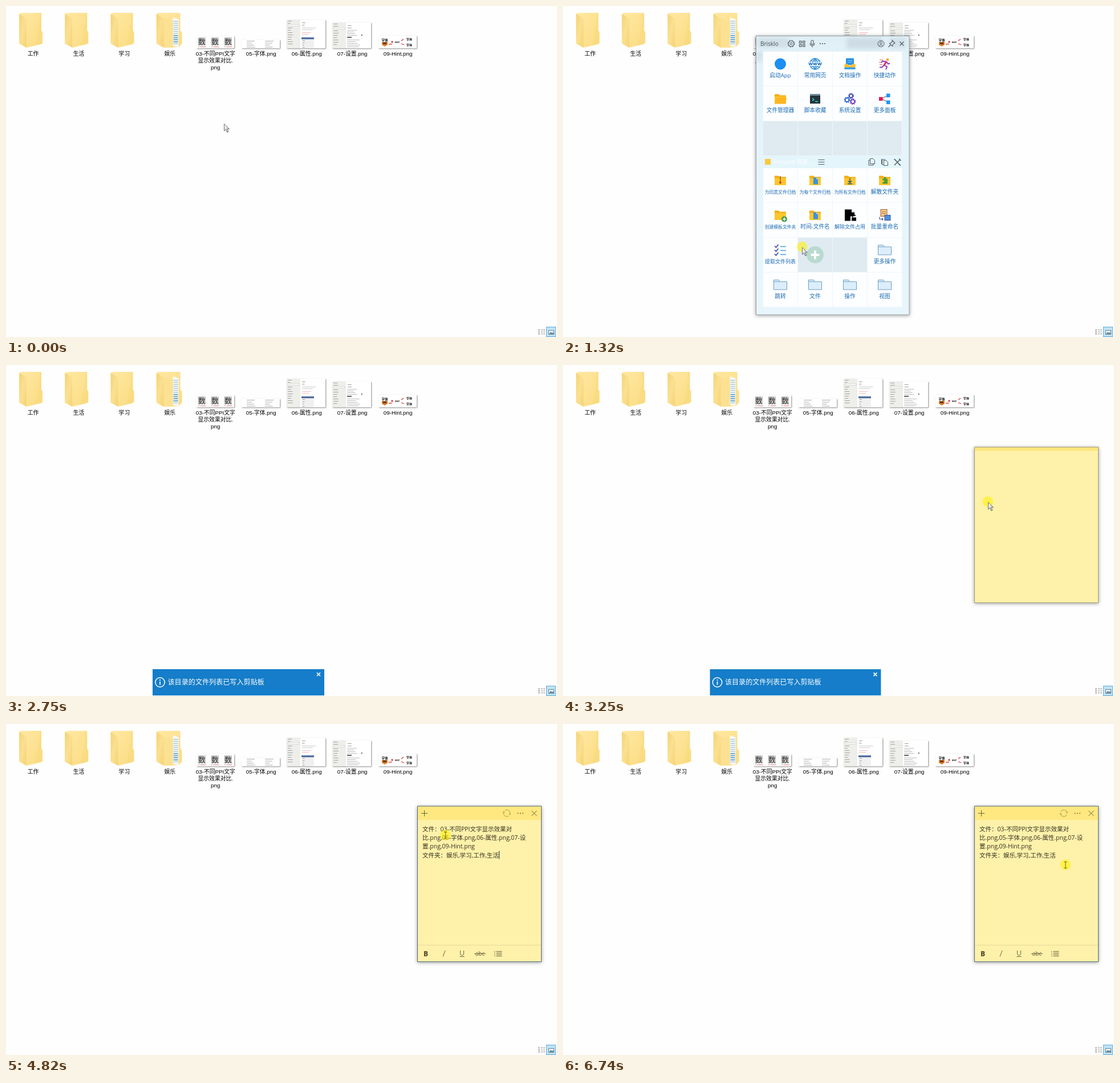
An HTML page that plays this animation: 966 by 580 pixels, repeating every 6790 ms.

```html
<!DOCTYPE html>
<html lang="zh-CN">
<head>
<meta charset="utf-8">
<title>文件列表</title>
<style>
html, body { margin: 0; width: 100%; height: 100%; overflow: hidden; background: #fefefe; }
svg { display: block; width: 966px; height: 580px; }
text { font-family: "Liberation Sans", "Noto Sans CJK SC", "Noto Sans CJK", sans-serif; white-space: pre; }
.ui text { font-family: "Open Sans", "Noto Sans CJK SC", "Noto Sans CJK", sans-serif; }
</style>
</head>
<body>
<svg id="stage" viewBox="0 0 966 580" xmlns="http://www.w3.org/2000/svg"></svg>
<script>
const LOOP = 6790;
const stage = document.getElementById('stage');

const rect = (x, y, w, h, fill, more = '') =>
  `<rect x="${x}" y="${y}" width="${w}" height="${h}" fill="${fill}" ${more}/>`;
const path = (d, fill, more = '') => `<path d="${d}" fill="${fill}" ${more}/>`;
const line = (d, stroke, width = 1, more = '') =>
  `<path d="${d}" fill="none" stroke="${stroke}" stroke-width="${width}" ${more}/>`;
const circle = (x, y, r, fill, more = '') => `<circle cx="${x}" cy="${y}" r="${r}" fill="${fill}" ${more}/>`;
const text = (x, y, s, size, fill = '#000', more = '') =>
  `<text x="${x}" y="${y}" font-size="${size}" fill="${fill}" ${more}>${s}</text>`;
const mid = 'text-anchor="middle"';
const at = (x, y, body) => `<g transform="translate(${x} ${y})">${body}</g>`;
const repeat = (n, make) => Array.from({ length: n }, (_, i) => make(i)).join('');

// Rows of tiny unreadable writing, with varied lengths
const scribble = (x, y, n, gap, width, color) => repeat(n, i =>
  rect(x, y + i * gap, width * (0.55 + 0.45 * Math.abs(Math.sin(i * 2.3 + x))), 1, color, 'opacity=".45"'));

const defs = `<defs>
  <linearGradient id="body" x2="1" y2="1"><stop stop-color="#ffe8a2"/><stop offset="1" stop-color="#fbdc83"/></linearGradient>
  <linearGradient id="flap" x2="1" y2="1"><stop stop-color="#f5d373"/><stop offset=".5" stop-color="#fbe092"/><stop offset="1" stop-color="#f5d373"/></linearGradient>
  <linearGradient id="arrow" x2="1" y2="1"><stop stop-color="#fff"/><stop offset="1" stop-color="#b4b8bc"/></linearGradient>
  <linearGradient id="glass" x2="0" y2="1"><stop stop-color="#dfedf4"/><stop offset=".08" stop-color="#e4f3fa"/><stop offset="1" stop-color="#e8f6fc"/></linearGradient>
  <filter id="blur"><feGaussianBlur stdDeviation="3"/></filter>
  <filter id="shade" x="-10%" y="-10%" width="120%" height="120%"><feDropShadow dx="0" dy="1" stdDeviation="3" flood-opacity=".4"/></filter>
  <filter id="small" x="-10%" y="-10%" width="120%" height="130%"><feDropShadow dx="1" dy="1" stdDeviation=".8" flood-opacity=".45"/></filter>
</defs>`;

function folder(x, filled) {
  if (!filled) {
    return at(x, 12, path('M2 0H39V31L41 34V53L38 55L13 61Z', 'url(#body)') +
      path('M27 57Q35 34 36 0H39V31L41 34V53L38 55Z', '#f8d877', 'opacity=".4"') +
      path('M0 1L11 9Q13 10 13 13V61L0 54Z', 'url(#flap)'));
  }
  const docs = path('M29 8L39 11V60L29 58Z', '#f8f8f5') +
    repeat(12, i => rect(30, 14 + i * 3.6, 8, 1.5, i > 6 && i < 11 ? '#3d8fc8' : '#a5cbe4'));
  return at(x, 12, path('M2 0H42V31L45 34V54L39 60L13 61Z', 'url(#body)') + docs +
    path('M12 9L29 14V61H13Z', '#fce193') + path('M0 1L11 9Q13 10 13 13V61L0 54Z', 'url(#flap)'));
}

const card = (x, y, w, h) => rect(x, y, w, h, '#fff', 'filter="url(#small)"');

function thumbnails() {
  const glyphs = repeat(3, i => {
    const x = 336.5 + i * 23;
    return rect(x, 55, 13.5, 14, '#c9c9c9') + text(x + 6.8, 66.8, '数', 12.8, '#333', mid) +
      rect(x, 71, 3, 1, '#aaa') + rect(x + 4, 71, 10, 1, '#e37a7a');
  });
  const settings = (x, y, h) => card(x, y, 68, h) + rect(x, y, 24, h, '#eeeeea') +
    scribble(x + 2, y + 2, 2, 4, 8, '#444') + rect(x + 2, y + 9, 20, 2.5, '#fff', 'stroke="#bbb" stroke-width=".5"') +
    scribble(x + 2, y + 14, Math.floor((h - 15) / 4), 4, 9, '#444') +
    scribble(x + 27, y + 5, 2, 4, 7, '#222');
  const six = settings(492, 24, 50) + scribble(519, 38, 2, 3, 30, '#888') + scribble(519, 46, 2, 3, 19, '#d66') +
    rect(518, 55, 22, 3.5, '#4f6da0') + rect(518, 58.5, 22, 15, '#f0f0f0') + scribble(520, 60, 4, 4, 4, '#444');
  const seven = settings(572, 29, 45) + scribble(598, 42, 4, 3, 18, '#666') + rect(598, 54, 8, 1.5, '#333') +
    scribble(598, 59, 5, 3, 23, '#666') + rect(623, 50, 1.5, 2, '#444');
  const bold = (x, y, s, size) => text(x, y, s, size, '#111', mid + ' font-weight="900"');
  const hint = card(653, 52, 67, 22) + path('M659 63H669V68L664 71L659 68Z', '#d9822b') + rect(661, 64, 6, 3, '#6a3515') +
    line('M671 68Q674 66 677 67M693 61L697 58M693 66L698 68', '#d33', 1.2) + circle(677, 63, 1.8, '#dd4646') +
    bold(664, 62, '字体', 5.5) + bold(686, 65, 'HINT', 3.7) + bold(707, 60, '字体', 5) + bold(707, 70, '字体', 5);
  return card(334, 53, 66, 21) + glyphs + card(413, 59, 67, 15) +
    scribble(422, 61, 4, 3.5, 15, '#444') + scribble(454, 61, 4, 3.5, 15, '#444') + six + seven + hint;
}

function desktop() {
  const names = ['工作', '生活', '学习', '娱乐', '03-不同PPI文字', '05-字体.png', '06-属性.png', '07-设置.png', '09-Hint.png'];
  const label = (x, y, s) => text(x, y, s, 9.8, '#000', mid);
  const list = repeat(3, i => rect(933, 566.5 + i * 3.5, 3, 2, '#aaa') + line(`M938 ${567.5 + i * 3.5}h3m1 0h3`, '#888'));
  return repeat(4, i => folder(23 + i * 80.2, i === 3)) + thumbnails() +
    names.map((s, i) => label(47.5 + i * 79.95, 86.5, s)).join('') +
    label(367.3, 98.5, '显示效果对比.') + label(367.3, 110.5, 'png') + list +
    rect(947.5, 562.5, 16, 17, '#bfe3f5', 'stroke="#62acd8"') +
    rect(951.5, 568.5, 9, 7, '#eef7fb', 'stroke="#6d8794"') + path('M952 574.5l3-3 2 1.5 2-1 1.5 2.5z', '#3e6a86');
}

const yellowFolder = (extra = '') => path('M-10-8h7l2 2h11v14h-20z', '#f2ad16') + rect(-10, -4, 20, 12.5, '#fdc62f', 'rx="1"') + extra;
const paleFolder = path('M-11.5-8.5h9l2 3h12v14h-23z', '#dceefb', 'stroke="#6c9fc6"') + line('M-11.5-5.5h11', '#6c9fc6');
const bluePage = path('M-3-5h5l3 3v9h-8z', '#3d94d8') + path('M2-5v3h3z', '#b5dcf7');
const gear = (x, y, r, color) => circle(x, y, r, 'none', `stroke="${color}" stroke-width="1.7"`) +
  circle(x, y, r + 1.4, 'none', `stroke="${color}" stroke-width="1.6" stroke-dasharray="${(r + 1.4) * Math.PI / 8}"`);

const icons = {
  launch: circle(0, 0, 10, '#1d8ff2'),
  globe: circle(0, 0, 9.5, 'none', 'stroke="#1b82d2" stroke-width="1.3"') +
    line('M0-9V9M-8-5H8M-8 5H8M0-9C-6-4-6 4 0 9C6 4 6-4 0-9', '#1b82d2', 1.1) + rect(-11, -3.5, 22, 7, '#fff') +
    text(0, 2.7, 'WWW', 7.5, '#1670bd', mid + ' font-weight="800"'),
  tray: rect(-7, -10, 14, 12, '#2a92e6', 'rx="1"') + line('M-4-6H4M-4-3H4', '#8ccaf8') +
    path('M-9.5 0H-4L-2 3H2L4 0H9.5V9H-9.5Z', '#fdc02f') + rect(-9.5, 6, 19, 3.5, '#3aa0ee'),
  run: circle(5, -7.5, 2.3, '#f5a623') + line('M3-4L-1 2L4 5L2 10M-1 2L-5 6H-9M3-4L-4-5L-6-2M3-4L6 0L9-1', '#8b3bc4', 2) +
    line('M-9-7h6M-10-3h4M-9 1h5', '#f0653a', 1.2) + line('M3-4L-1 2', '#e8305c', 3),
  files: yellowFolder(path('M-10 9L-7-2H11L9 9Z', '#ffb520')),
  shell: rect(-9, -8.5, 18, 17, '#24343c') + rect(-9, -8.5, 18, 3, '#78909c') + line('M-5-1l3 2.5-3 2.5M0 5h5', '#39e0d0', 1.4),
  gears: gear(-5, 2, 3.3, '#2869c9') + gear(2, -5, 3, '#3446b4') + gear(5, 5, 3.3, '#6e35b9'),
  share: line('M-6 0L6-6M-6 0L6 6', '#8795a3', 1.5) + rect(-10, -3, 6.5, 6.5, '#e5174f') + rect(3, -9, 6.5, 6.5, '#2196f3') + rect(3, 3, 6.5, 6.5, '#2196f3'),
  zip: yellowFolder(line('M0-7V2', '#8b4b20', 2, 'stroke-dasharray="1.5 1"') + circle(0, 4, 2, '#d04028')),
  each: yellowFolder(bluePage),
  all: yellowFolder(line('M0-4V4M-3 1L0 4L3 1M-4 6H4', '#24526d', 1.4)),
  split: yellowFolder(path('M-4-3h3q-1-3 1.5-3t1.5 3h3v9h-9v-3q3 1 3-1.5t-3-1.5z', '#4f9d37')),
  add: yellowFolder(circle(7, 7, 5, '#3e9d3d') + line('M4 7H10M7 4V10', '#fff', 1.6)),
  unlock: path('M-9-10H3L8-5V10H-9Z', '#000') + path('M3-10V-5H8Z', '#fff') +
    rect(1, 2, 11, 9, '#fff') + rect(3, 4, 8, 6, '#000') + line('M4.5 4V2q0-2.5 2.5-2.5t2.5 2', '#000', 1.3),
  rename: rect(-7, -10, 11, 12, '#f7c889', 'stroke="#a05d32"') + line('M-5-6H2M-5-3H2', '#b5704a') + rect(0, 0, 10, 9, '#4d8fd6', 'stroke="#41589a"') +
    line('M-9 3v4h6M-5 5l2 2-2 2', '#558', 1.2),
  checks: repeat(3, i => line(`M-10 ${-7 + i * 7}l2.5 2.5l4-5`, '#3c41b5', 1.6) + line(`M0 ${-6 + i * 7}h10`, '#4aa5ee', 1.6)),
  pale: paleFolder
};

function cell(col, row, icon, label, size = 9.7) {
  const x = 351 + col * 61;
  return rect(x, row, 60, 60, '#fdfeff') + at(x + 30, row + 21.5, icons[icon]) +
    text(x + 30, row + 42 + size * 0.36, label, size, '#1b6cb5', mid);
}
const gap = (col, row) => rect(351 + col * 61, row, 60, 60, '#e0ebf1');

function panel() {
  const g = '#555d63';
  const dots = (x, y) => repeat(3, i => circle(x + i * 4, y, 1.1, g));
  const ghosts = `<g filter="url(#blur)" opacity=".35">${rect(342, 56, 54, 17, '#b4c4cc')}${rect(497, 56, 62, 19, '#a9bcc6')}${rect(574, 56, 26, 18, '#b7c8d1')}${rect(341, 80, 8, 18, '#a9bcc6')}</g>`;
  const head = text(346, 69.8, 'Brisklo', 10, '#4b5359') +
    circle(400, 66, 2, 'none', `stroke="${g}"`) + circle(400, 66, 5, 'none', `stroke="${g}" stroke-width="1.2"`) +
    circle(400, 66, 6, 'none', `stroke="${g}" stroke-dasharray="2.2 2.5"`) +
    repeat(4, i => rect(414.5 + (i % 2) * 6, 61.5 + (i >> 1) * 6, 3.5, 3.5, 'none', `stroke="${g}" stroke-width="1.2"`)) +
    rect(435, 60, 4, 7.5, 'none', `rx="2" stroke="${g}" stroke-width="1.1"`) + line('M433 65q0 4.5 4 4.5t4-4.5M437 69.5v3', g, 1.1) +
    dots(451, 66) + circle(557.5, 66, 5.5, 'none', `stroke="${g}"`) + circle(557.5, 64.5, 2, 'none', `stroke="${g}"`) + line('M554 70q3.5-4 7 0', g) +
    line('M577 60l5 5-2 .5-2 3-.5 2-5-5 2-.5 3-3zM574.5 68l-4 4', g, 1.1) + line('M590.5 62.5l7 7m0-7l-7 7', g, 1.2);
  const bar = rect(354, 268, 10, 10, '#fbc73c') + text(369, 277, 'Fenvora 资源…', 10, '#fff') +
    line('M447.5 269.5h11m-11 4h11m-11 4h11', g, 1.1) +
    line('M538.5 267.5h5l3 3v6h-8zM538 270h-2v9h8v-2', g) + line('M565 269h-5.5v9h3M562.5 270.5h4l3 3v6h-7zM558.5 268v9', g) +
    line('M582 269l9 10M591 269l-10 10M580.5 268l3 3M589 267.5l3.5 3.5M589 278l3 1', g, 1.5);
  return rect(338.5, 52.5, 268.5, 488.5, 'url(#glass)', 'stroke="#929da3" filter="url(#shade)"') + ghosts +
    rect(351, 80, 244, 448, '#edf7fb') + rect(351, 263, 244, 21, '#e4f5fc') + head + bar +
    cell(0, 80, 'launch', '启动App') + cell(1, 80, 'globe', '常用网页') + cell(2, 80, 'tray', '文档操作') + cell(3, 80, 'run', '快捷动作') +
    cell(0, 141, 'files', '文件管理器') + cell(1, 141, 'shell', '脚本收藏') + cell(2, 141, 'gears', '系统设置') + cell(3, 141, 'share', '更多面板') +
    repeat(4, i => gap(i, 202)) +
    cell(0, 284, 'zip', '为同类文件归档', 7.8) + cell(1, 284, 'each', '为每个文件归档', 7.8) + cell(2, 284, 'all', '为所有文件归档', 7.8) + cell(3, 284, 'split', '解散文件夹') +
    cell(0, 345, 'add', '创建模板文件夹', 7.8) + cell(1, 345, 'each', '时间-文件名') + cell(2, 345, 'unlock', '解除文件占用', 9) + cell(3, 345, 'rename', '批量重命名') +
    cell(0, 406, 'checks', '提取文件列表', 9) + gap(1, 406) + gap(2, 406) + cell(3, 406, 'pale', '更多操作') +
    ['跳转', '文件', '操作', '视图'].map((s, i) => cell(i, 467, 'pale', s)).join('') +
    `<g id="plus">${circle(442, 436, 15, '#b9dacf')}${line('M434.5 436h15m-7.5-7.5v15', '#fff', 4)}</g>` +
    rect(351, 406, 60, 60, '#7cc4ee', 'id="hover" opacity=".22"');
}

const toast = rect(-150.5, -23, 301, 46, '#157dc9') +
  circle(-137.5, 0, 8.2, 'none', 'stroke="#fff" stroke-width="1.5"') + line('M-137.5-1.5v6', '#fff', 1.7) + circle(-137.5, -4, 1.1, '#fff') +
  text(-124, 4.3, '该目录的文件列表已写入剪贴板', 12.1, '#fff', 'font-weight="500"') + line('M137.5-17l6 6m0-6l-6 6', '#fff', 1.7);

function note() {
  const g = '#6b6440';
  const rows = ['文件：03-不同PPI文字显示效果对', '比.png,05-字体.png,06-属性.png,07-设', '置.png,09-Hint.png', '文件夹：娱乐,学习,工作,生活'];
  const tools = rect(721, 144, 218, 24, '#ffe87f') + line('M728 156.5h11m-5.5-5.5v11M921.5 152l9 9m0-9l-9 9', g) +
    repeat(3, i => circle(897.5 + i * 4.3, 156.5, 0.9, g)) +
    `<g id="sync">${line('M-5.5 1A5.5 5.5 0 0 1 4-3.8M5.5-1A5.5 5.5 0 0 1-4 3.8M4.5-6v2.5h-2.5M-4.5 6v-2.5h2.5', '#b5a55c')}</g>` +
    line('M721 387.5h218', '#eadb98') + text(736, 406.5, 'B', 12, '#5b5434', mid + ' font-weight="800"') +
    line('M770 397l-4 10.5M796.5 397v5q0 3.5 3 3.5t3-3.5v-5M795.5 407.5h8', g) +
    text(831, 405.5, 'abc', 10, g, mid) + line('M821 402.5h20', g) +
    repeat(4, i => line(`M856 ${398.5 + i * 2.7}h1.5m2 0h10`, g));
  return rect(721, 144, 218, 273, '#fef1aa', 'filter="url(#shade)"') + rect(721, 144, 218, 6.5, '#ffe67c') +
    `<g id="tools">${tools}</g>` + rect(721.5, 144, 217, 272.5, 'none', 'id="edge"') +
    `<g id="words">${rows.map((s, i) => text(730, 188 + i * 15.2, s, 10.5, '#33301f')).join('')}</g>` +
    rect(0, 0, 1, 14, '#222', 'id="caret"');
}

stage.innerHTML = defs + desktop() + `<g class="ui"><g id="panel">${panel()}</g><g id="toast">${toast}</g><g id="note">${note()}</g></g>
  <g id="cursor">${circle(0, -0.5, 9.2, '#fff200', 'id="halo" opacity=".58"')}
  ${path('M.5.5V13l3-2.7 2.2 5 2.3-1-2.2-4.8h3.7z', 'url(#arrow)', 'id="pointer" stroke="#666" stroke-width=".9" stroke-linejoin="round"')}
  ${line('M-2.5-5.5h2l.5.5.5-.5h2M0-5V5M-2.5 5.5h2l.5-.5.5.5h2', '#8a8420', 1.3, 'id="beam"')}</g>`;

const part = {};
stage.querySelectorAll('[id]').forEach(node => part[node.id] = node);

const clamp = v => Math.max(0, Math.min(1, v));
const smooth = p => p * p * (3 - 2 * p);
const easeOut = p => 1 - (1 - p) ** 3;
const show = (node, on) => node.setAttribute('visibility', on ? 'inherit' : 'hidden');
const place = (node, x, y, more = '') => node.setAttribute('transform', `translate(${x} ${y}) ${more}`);

// time, x, y
const trail = [
  [0, 382, 206], [40, 382, 206], [320, 472, 272], [930, 472, 272], [1320, 419, 422.5], [1510, 393, 437],
  [2390, 393, 437], [2740, 637, 317], [3250, 745, 240], [3750, 761, 168], [4000, 761, 168],
  [4350, 770.5, 195], [5270, 770.5, 195], [5970, 881, 247], [LOOP, 881, 247]
];

function cursorAt(t) {
  const i = Math.max(1, trail.findIndex(stop => stop[0] > t));
  const [a, b] = [trail[i - 1], trail[i]];
  const p = smooth((t - a[0]) / (b[0] - a[0]));
  return [a[1] + (b[1] - a[1]) * p, a[2] + (b[2] - a[2]) * p];
}

function draw(t) {
  const [x, y] = cursorAt(t);
  place(part.cursor, x, y);
  show(part.cursor, t < 2750 || t >= 3250);
  show(part.halo, t >= 40);
  const typing = t >= 4150;
  show(part.pointer, !typing);
  show(part.beam, typing);

  const open = t >= 300 && t < 1710;
  show(part.panel, open);
  part.panel.setAttribute('opacity', clamp((t - 280) / 120));
  const inRow = open && y > 406 && y < 466;
  show(part.plus, inRow && x >= 412 && x < 472);
  show(part.hover, inRow && x < 412);

  const grow = easeOut(clamp((t - 1900) / 365)) * (1 - smooth(clamp((t - 3240) / 300)));
  show(part.toast, grow > 0);
  part.toast.setAttribute('opacity', grow);
  place(part.toast, 407.5, 556, `scale(${grow})`);

  const active = t >= 3960;
  show(part.note, t >= 3060);
  show(part.tools, active);
  part.tools.setAttribute('opacity', clamp((t - 3940) / 150));
  part.edge.setAttribute('stroke', active ? '#566f7d' : '#a39c79');

  const pasted = t >= 4640;
  show(part.words, pasted);
  const blink = Math.floor((t - (pasted ? 4640 : 4110)) / 530) % 2 === 0;
  show(part.caret, t >= 4110 && blink);
  place(part.caret, pasted ? 864 : 730, pasted ? 222.5 : 177);
  place(part.sync, 878, 156.3, `rotate(${Math.max(0, t - 4640) * 0.36})`);
}

const start = performance.now();
function tick() {
  draw((performance.now() - start) % LOOP);
  requestAnimationFrame(tick);
}
draw(0);
requestAnimationFrame(tick);
</script>
</body>
</html>
```
